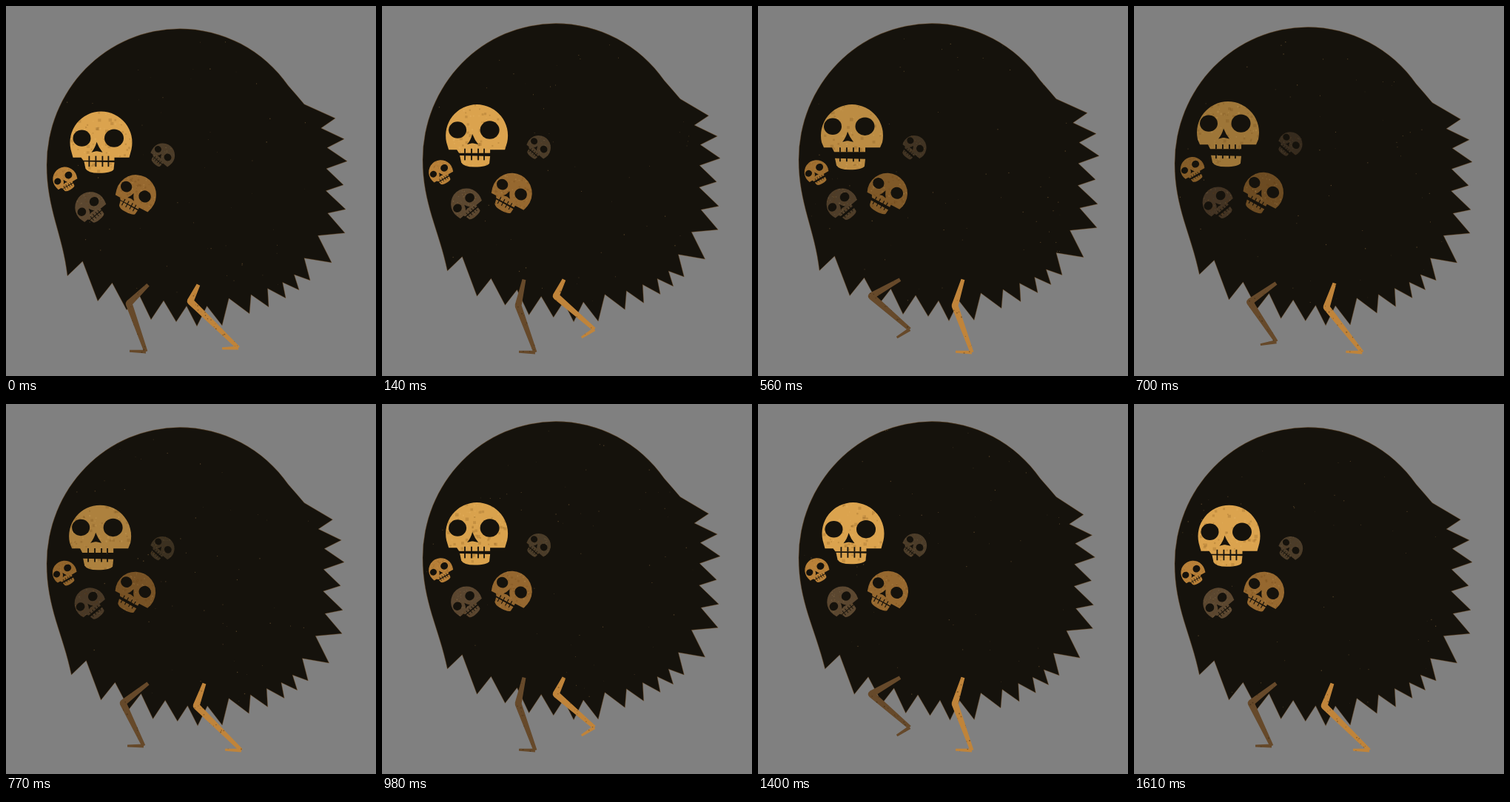
Recreate the animation shown at these times as an HTML page with a canvas. Size 500 px wide and 500 px high, loop 1680 ms.

```html
<!DOCTYPE html>
<html lang="en">
<head>
<meta charset="utf-8">
<title>Walking furball</title>
<style>
  html, body { margin: 0; width: 100%; height: 100%; overflow: hidden; background: #808080; }
  canvas { display: block; width: 100vw; height: 100vh; }
</style>
</head>
<body>
<canvas id="stage" width="500" height="500"></canvas>
<script>
const ctx = document.getElementById('stage').getContext('2d');
const STEP = 70, COUNT = 24, STRIDE = 12, TAU = Math.PI * 2;
const INK = '#15120c';

// Tips of the fur spikes, clockwise from the upper right
const TIPS = [[445, 152], [457, 180], [461, 210], [456, 242], [459, 275], [458, 307], [440, 347],
  [411, 371], [396, 384], [378, 395], [355, 407], [329, 416], [292, 432], [258, 433], [230, 427],
  [196, 424], [163, 411], [124, 399], [83, 365]];

// Stride of one leg: step, knee, heel, direction of the foot in degrees
const POSES = [
  [0, 166, 402, 189, 467, 182],
  [2, 184, 405, 207, 468, 182],
  [5, 175, 408, 236, 468, 182],
  [6, 167, 399, 232, 462, 178],
  [8, 153, 392, 205, 437, 142],
  [11, 158, 404, 186, 462, 180]];

// Small skulls bounce with the walk, each by its own amount
const SKULLS = [
  { x: 212, y: 193, bounce: 9, size: .39, turn: 40, rgb: [75, 60, 41] },
  { x: 79.5, y: 226, bounce: 8, size: .39, turn: -30, rgb: [184, 128, 56] },
  { x: 114, y: 268, bounce: 4, size: .5, turn: -40, rgb: [91, 71, 48] },
  { x: 176, y: 253, bounce: 2, size: .65, turn: 28, rgb: [150, 104, 47] },
  { x: 128.5, y: 176, bounce: 8, size: 1, turn: 0, rgb: [219, 163, 78] }];

const CHIN = new Path2D('M-23 26.5L18 27.5L17 37Q14 42 -3 42Q-18 42 -21 36Z');
const NOSE = new Path2D('M-6 0Q-3 8 2 14L-5 12.5L-7 12.5L-13 14Q-8 8 -6 0Z');

const mix = (a, b, t) => a + (b - a) * t;
const shade = (rgb, k) => `rgb(${rgb.map(v => Math.round(v * k))})`;

function random(seed) {
  return () => {
    seed = (seed * 1664525 + 1013904223) >>> 0;
    return seed / 4294967296;
  };
}

// Two rises of the body per stride
const bob = step => .8 - 4.2 * (1 - Math.cos(TAU * (step + .7) / 6));
const gape = step => Math.min(1, Math.max(0, 1.15 * Math.sin(Math.PI * (step - 1) / 14)));
const dim = step => 1 - .28 * Math.exp(-(((step - 9.8) / 2.2) ** 2));

function dust(rnd, count, x, y, w, h, colour, size) {
  ctx.fillStyle = colour;
  for (let i = 0; i < count; i++) {
    const s = size * (.5 + rnd());
    ctx.fillRect(x + rnd() * w, y + rnd() * h, s, s);
  }
}

// The fur sways inwards and back over four drawings
function fur(drawing) {
  const sway = Math.sin(Math.PI * drawing / 4);
  const tips = TIPS.map(([x, y], i) => [x - sway * .035 * (x - 300), y + sway * (5 - i * .25)]);
  const [endX, endY] = tips[tips.length - 1];
  const path = new Path2D();
  path.moveTo(endX, endY);
  path.bezierCurveTo(77, 310, 55, 275, 55, 215);
  path.ellipse(235, 215, 180, 184, 0, Math.PI, TAU - .62);
  path.quadraticCurveTo(393, 121, 403, 133);
  tips.forEach(([x, y], i) => {
    if (i) {
      // Notch: between two tips, drawn in towards the heart of the body
      const [px, py] = tips[i - 1];
      const mx = (x + px) / 2, my = (y + py) / 2;
      const dx = Math.min(mx, 250) - mx, dy = 110 + .3 * my - my;
      const depth = (10 + .5 * Math.hypot(x - px, y - py)) / Math.hypot(dx, dy);
      path.lineTo(mx + dx * depth, my + dy * depth);
    }
    path.lineTo(x, y);
  });
  path.closePath();
  return path;
}
const FUR = [0, 1, 2, 3].map(fur);

function drawBody(step, rnd) {
  const shape = FUR[Math.floor(step / 2) % 4];
  ctx.save();
  ctx.translate(0, bob(step));
  ctx.fillStyle = INK;
  ctx.fill(shape);
  ctx.lineWidth = .8;
  ctx.strokeStyle = 'rgba(120,78,30,.5)';
  ctx.stroke(shape);
  ctx.clip(shape);
  dust(rnd, 70, 60, 40, 360, 370, 'rgba(130,100,60,.55)', .9);
  ctx.restore();
}

function limb(path, a, b, wa, wb) {
  const dx = b[0] - a[0], dy = b[1] - a[1], r = Math.hypot(dx, dy) || 1;
  const nx = -dy / r / 2, ny = dx / r / 2;
  path.moveTo(a[0] - nx * wa, a[1] - ny * wa);
  path.lineTo(b[0] - nx * wb, b[1] - ny * wb);
  path.lineTo(b[0] + nx * wb, b[1] + ny * wb);
  path.lineTo(a[0] + nx * wa, a[1] + ny * wa);
  path.closePath();
}

function pose(step) {
  const next = POSES.findIndex(p => p[0] > step);
  const a = POSES.at(next < 0 ? -1 : next - 1), b = POSES[Math.max(next, 0)];
  const t = (step - a[0]) / ((b[0] || STRIDE) - a[0]);
  return a.map((v, i) => mix(v, b[i], t));
}

function drawLeg(step, near, rnd) {
  const [, kx, ky, hx, hy, angle] = pose((step + (near ? STRIDE / 2 : 0)) % STRIDE);
  const foot = angle * Math.PI / 180;
  const knee = [kx, ky], heel = [hx, hy];
  const hip = [near ? kx + 11 : 192, 377 + bob(step)];
  const toe = [hx + 22 * Math.cos(foot), hy + 18 * Math.sin(foot)];
  const leg = new Path2D();
  limb(leg, hip, knee, 5, 9);
  limb(leg, knee, heel, 9, 5);
  limb(leg, heel, toe, 5, 3);
  leg.moveTo(kx + 4.3, ky);
  leg.arc(kx, ky, 4.3, 0, TAU);
  ctx.save();
  ctx.translate(near ? 82 : 0, 0);
  ctx.fillStyle = near ? '#c0843a' : '#66492a';
  ctx.fill(leg);
  ctx.clip(leg);
  dust(rnd, 120, kx - 10, hip[1], 85, 100, 'rgba(40,28,12,.4)', 1.2);
  ctx.restore();
}

function cranium(open) {
  const cheek = 21 - 4 * open, teeth = 25 - 2 * open;
  return new Path2D(`M-41 10A42 42 0 1 1 41 10L38 ${cheek}H18V${teeth}H-24L-27 ${cheek}H-38Z`);
}

function drawSkull({ x, y, bounce, size, turn, rgb }, step, rnd) {
  const open = gape(step) * (size < 1 ? .6 : 1);
  const drop = 5 * open, lift = 6.5 * open, bite = 25 - 2 * open;
  const bone = (shape, dy) => {
    ctx.save();
    ctx.translate(0, dy);
    ctx.fillStyle = shade(rgb, dim(step));
    ctx.fill(shape);
    ctx.clip(shape);
    dust(rnd, 60, -42, -42, 84, 84, 'rgba(95,55,15,.18)', 3);
    dust(rnd, 60, -42, -42, 84, 84, 'rgba(255,215,140,.12)', 2);
    ctx.restore();
  };

  ctx.save();
  ctx.translate(x - 1.5 * gape(step) * size, y + bounce * Math.cos(TAU * step / 6 - .3));
  ctx.rotate(turn * Math.PI / 180);
  ctx.scale(size, size);
  bone(cranium(open), 0);
  bone(CHIN, drop);

  // Looking up as the mouth opens
  ctx.fillStyle = INK;
  for (const [ex, r] of [[-26, 12], [17.5, 13]]) {
    ctx.beginPath();
    ctx.ellipse(ex, -5 - lift, r, r - .8, 0, 0, TAU);
    ctx.fill();
  }
  ctx.translate(0, -.7 * lift);
  ctx.fill(NOSE);
  ctx.translate(0, .7 * lift);
  for (const tx of [-17, -8, 1, 9]) {
    ctx.fillRect(tx, bite - 6, 1.8, 6.2);
    ctx.fillRect(tx, 26 + drop, 1.8, 7.5 - 2.5 * open);
  }
  ctx.restore();
}

function draw(step) {
  const rnd = random(7919 * (step + 1));
  ctx.fillStyle = '#808080';
  ctx.fillRect(0, 0, 500, 500);
  drawBody(step, rnd);
  drawLeg(step, false, rnd);
  drawLeg(step, true, rnd);
  SKULLS.forEach(s => drawSkull(s, step, rnd));
}

let shown = -1;
function tick() {
  const step = Math.floor(performance.now() / STEP) % COUNT;
  if (step !== shown) draw(shown = step);
  requestAnimationFrame(tick);
}
tick();
</script>
</body>
</html>
```
